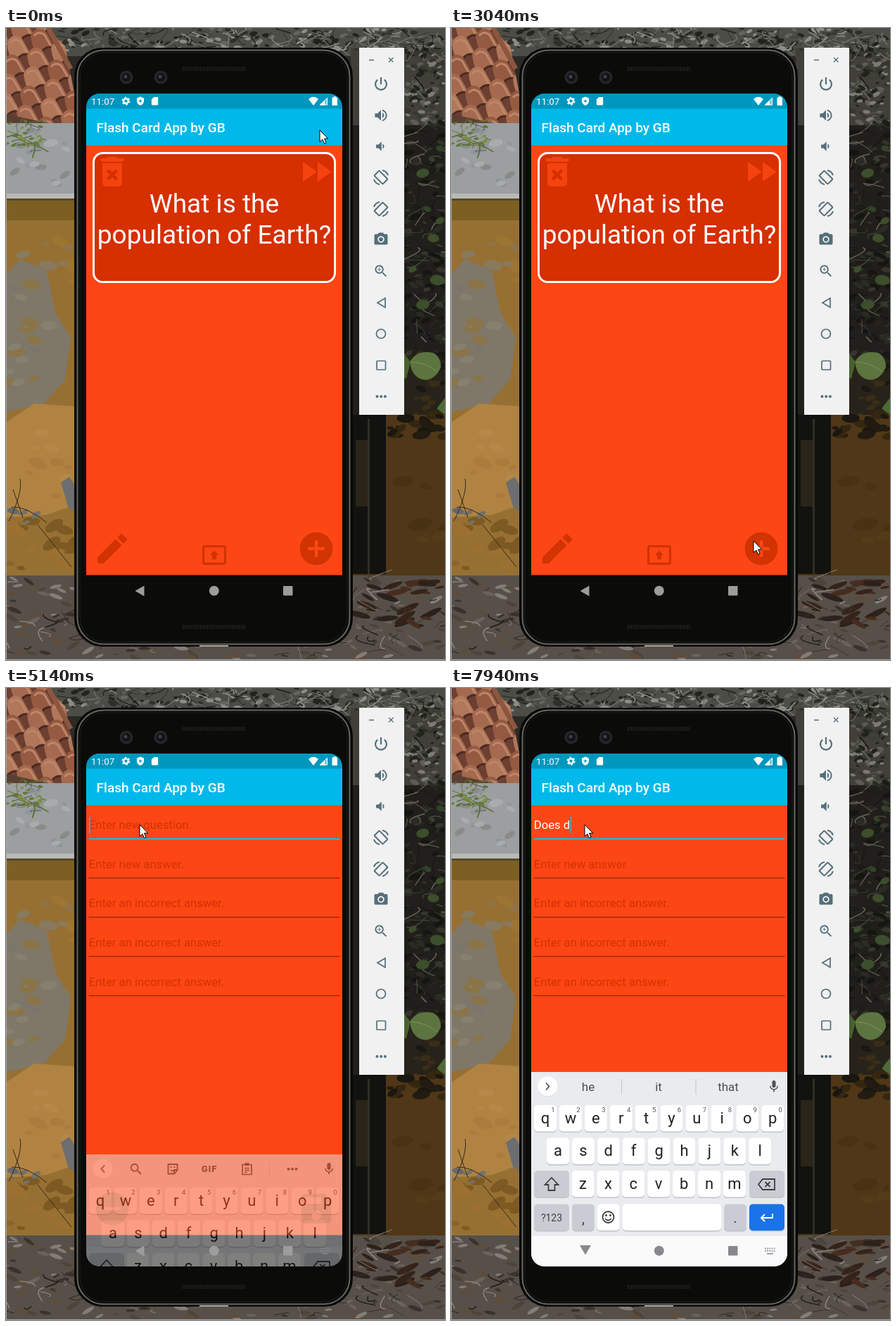
An HTML page that plays this animation: 624x897 px, repeating every 8 s.

```html
<!DOCTYPE html>
<html lang="en">
<head>
<meta charset="utf-8">
<title>Flash cards</title>
<style>
html, body { margin: 0; width: 100%; height: 100%; overflow: hidden; background: #333; }
svg { display: block; width: 100vw; height: 100vh; }
text { font-family: Roboto, sans-serif; white-space: pre; }
</style>
</head>
<body>
<svg id="stage" viewBox="0 0 624 897"></svg>
<script>
const ORANGE = '#fc4614', CARD = '#d62f00', DIM = '#d13302', CYAN = '#00b9ea', TEAL = '#0097be';
const SLATE = '#546e7a', GREY = '#50545a', BEZEL = '#0b0b09';

// ---- drawing helpers ----
const rect = (x, y, w, h, fill, r = 0, more = '') =>
  `<rect x="${x}" y="${y}" width="${w}" height="${h}" rx="${r}" fill="${fill}" ${more}/>`;
const circle = (x, y, r, fill, more = '') => `<circle cx="${x}" cy="${y}" r="${r}" fill="${fill}" ${more}/>`;
const shape = (d, fill, more = '') => `<path d="${d}" fill="${fill}" ${more}/>`;
const line = (d, stroke, width = 2, more = '') =>
  `<path d="${d}" fill="none" stroke="${stroke}" stroke-width="${width}" ${more}/>`;
const text = (x, y, s, size, fill, anchor = 'start', more = '') =>
  `<text x="${x}" y="${y}" font-size="${size}" fill="${fill}" text-anchor="${anchor}" ${more}>${s}</text>`;
const group = (id, body, more = '') => `<g id="${id}" ${more}>${body}</g>`;
const place = (x, y, scale, body) => `<g transform="translate(${x} ${y}) scale(${scale}) translate(-12 -12)">${body}</g>`;
const icon = (name, x, y, scale, fill) => place(x, y, scale, shape(ICONS[name], fill, 'fill-rule="evenodd"'));
const repeat = (n, f) => Array.from({ length: n }, (_, i) => f(i)).join('');

const DISC = 'M12 2a10 10 0 1 0 .01 0z';
const LENS = 'M15.5 14h-.8l-.3-.3A6.5 6.5 0 1 0 13.7 14.4l.3.3v.8l5 5 1.5-1.5zm-6 0a4.5 4.5 0 1 1 .01 0z';
const ICONS = {
  trash: 'M6 19c0 1.1.9 2 2 2h8c1.1 0 2-.9 2-2V7H6zm2.46-7.12 1.41-1.41L12 12.59l2.12-2.12 1.41 1.41L13.41 14l2.12 2.12-1.41 1.41L12 15.41l-2.12 2.12-1.41-1.41L10.59 14zM15.5 4l-1-1h-5l-1 1H5v2h14V4z',
  next: 'M4 18l8.5-6L4 6zM13 6v12l8.5-6z',
  edit: 'M3 17.25V21h3.75L17.81 9.94l-3.75-3.75zM20.71 7.04c.39-.39.39-1.02 0-1.41l-2.34-2.34c-.39-.39-1.02-.39-1.41 0l-1.83 1.83 3.75 3.75z',
  show: 'M21 3H3c-1.1 0-2 .9-2 2v14c0 1.1.9 2 2 2h18c1.1 0 2-.9 2-2V5c0-1.1-.9-2-2-2zm0 16H3V5h18zM10 12H8l4-4 4 4h-2v4h-4z',
  add: DISC + 'M17 13h-4v4h-2v-4H7v-2h4V7h2v4h4z',
  remove: DISC + 'M17 13H7v-2h10z',
  save: 'M17 3H5c-1.1 0-2 .9-2 2v14c0 1.1.9 2 2 2h14c1.1 0 2-.9 2-2V7zm-5 16a3 3 0 1 1 .01 0zm3-10H5V5h10z',
  quiet: 'M18.5 12c0-1.8-1-3.3-2.5-4v8c1.5-.7 2.5-2.2 2.5-4zM5 9v6h4l5 5V4L9 9z',
  loud: 'M3 9v6h4l5 5V4L7 9zM16.5 12c0-1.8-1-3.3-2.5-4v8c1.5-.7 2.5-2.2 2.5-4zM14 3.2v2.1a7 7 0 0 1 0 13.4v2.1a9 9 0 0 0 0-17.6z',
  camera: 'M9 2 7.2 4H4c-1.1 0-2 .9-2 2v12c0 1.1.9 2 2 2h16c1.1 0 2-.9 2-2V6c0-1.1-.9-2-2-2h-3.2L15 2zm3 15a5 5 0 1 1 .01 0zM12 15.2a3.2 3.2 0 1 0-.01 0z',
  search: LENS,
  zoom: LENS + 'M9 7h1v2h2v1h-2v2H9v-2H7V9h2z',
  shield: 'M12 1 3 5v6c0 5.5 3.8 10.7 9 12 5.2-1.3 9-6.5 9-12V5zM12 7l1.5 3.5L17 12l-3.5 1.5L12 17l-1.5-3.5L7 12l3.5-1.5z',
  sdcard: 'M18 2h-8L4 8v12c0 1.1.9 2 2 2h12c1.1 0 2-.9 2-2V4c0-1.1-.9-2-2-2z',
  mic: 'M12 14c1.7 0 3-1.3 3-3V5a3 3 0 0 0-6 0v6c0 1.7 1.3 3 3 3zM17.3 11a5.3 5.3 0 0 1-10.6 0H5c0 3.4 2.7 6.2 6 6.7V21h2v-3.3c3.3-.5 6-3.3 6-6.7z',
};

// ---- garden wall behind the phone ----
let seed = 7;
const random = () => (seed = seed * 16807 % 2147483647) / 2147483647;
const pick = list => list[Math.floor(random() * list.length)];
const scatter = (n, x, y, w, h, size, colors, flat = .5) => repeat(n, () => {
  const cx = x + random() * w, cy = y + random() * h, r = size * (.4 + random() * .8);
  return `<ellipse cx="${cx}" cy="${cy}" rx="${r}" ry="${r * flat}" fill="${pick(colors)}" transform="rotate(${random() * 70 - 35} ${cx} ${cy})"/>`;
});
const twigs = (n, x, y, w, h, colors) => repeat(n, () => {
  const px = x + random() * w, py = y + random() * h;
  return line(`M${px} ${py}q${random() * 30 - 15} ${random() * 16 - 8} ${random() * 60 - 30} ${random() * 40 - 20}`, pick(colors), .5 + random() * 1.2);
});
// Rounded clay tiles in columns that run down to the right.
const tiles = repeat(6, row => repeat(5, col => {
  const x = col * 29 - row * 5 - 18, y = row * 27 + col * 17 - 58;
  return `<g transform="translate(${x} ${y})">` +
    shape('M0 8Q8-8 21 1L35 26Q22 20 12 37Q2 28 0 8z', ['#a4694e', '#955a42', '#b1775a'][(row * 2 + col) % 3]) +
    line('M5 8Q12 0 20 7L29 23', '#bd8669', 3) + line('M12 36Q21 19 35 26', '#4a2a22', 3) + '</g>';
}));

const garden = rect(0, 0, 624, 897, '#2c2a25') +
  rect(60, 0, 564, 40, '#4d4d47') + rect(490, 28, 134, 110, '#403f39') +
  scatter(160, 80, 0, 544, 32, 6, ['#2e2e2a', '#65655f', '#8d8d87', '#22221f']) +
  twigs(130, 80, 0, 544, 34, ['#1f1e1b', '#8f8f89', '#3b3932', '#6f6e68']) +
  rect(490, 138, 134, 412, '#211f1b') +
  scatter(90, 566, 30, 58, 105, 6, ['#23231e', '#5c5c54', '#35362f', '#7c7b74']) +
  scatter(110, 566, 135, 58, 330, 7, ['#151512', '#2a2b25', '#36352c', '#1b1c17']) +
  twigs(90, 566, 20, 58, 430, ['#66645c', '#141411', '#3a412d']) +
  scatter(9, 575, 160, 46, 240, 9, ['#3c4e2b', '#32422a'], .7) +
  rect(566, 465, 58, 85, '#28231a') + scatter(20, 566, 465, 58, 85, 8, ['#1a1813', '#3a2d18']) +
  rect(490, 549, 134, 228, '#4f3717') +
  scatter(22, 540, 548, 84, 34, 11, ['#211b12', '#35270f', '#191710']) +
  shape('M490 549h50v226h-50z', '#12120f') + rect(497, 585, 20, 94, '#2b2519') + rect(514, 555, 3, 220, '#302e28') +
  scatter(6, 545, 620, 79, 130, 16, ['#543b19', '#493214']) +
  shape('M574 474q10-18 33-13 12 7 11 21-9 19-25 17-16-3-19-25z', '#5c7540') + line('M575 474q20 0 38 14', '#7d9459', 1) +
  shape('M566 462l9 12-6 24-3-2z', '#47612f') + shape('M612 540l12-15v24z', '#4e6a37') +
  `<clipPath id="roof"><path d="M0 0H58L84 26 97 92V135H0z"/></clipPath>` +
  `<g clip-path="url(#roof)">${rect(0, 0, 100, 140, '#6c3f31')}${tiles}</g>` +
  line('M60 0L92 58', '#8b5640', 7) + shape('M0 122L60 135H0z', '#5a4032') +
  rect(0, 135, 98, 105, '#9b9f9f') + scatter(18, 12, 145, 76, 80, 9, ['#90959a', '#a8acac', '#878c8b']) +
  twigs(18, 4, 135, 45, 45, ['#596a2e', '#73833c', '#4a4a30']) + scatter(24, 2, 130, 50, 40, 3.5, ['#5f7733', '#7b8e45']) +
  rect(0, 235, 98, 7, '#b9bab6') + rect(0, 242, 98, 4, '#57492a') +
  rect(0, 245, 98, 532, '#967033') + rect(0, 245, 98, 28, '#7c5f22') +
  scatter(12, 0, 300, 98, 60, 12, ['#8d744a', '#9c7533', '#887a60']) +
  shape('M0 350l20-22 38 16 12 60 22 35-8 60-30 34-54 12z', '#7f7869') +
  scatter(20, 0, 360, 64, 165, 11, ['#7a766c', '#86806f', '#8a7448']) +
  shape('M0 560l40-27 58 4v140l-40 14-58 4z', '#b08343') +
  scatter(9, 0, 570, 90, 110, 13, ['#b58849', '#a97c3d']) +
  scatter(18, 0, 695, 98, 72, 12, ['#8a6428', '#7d5923', '#9b7031']) +
  shape('M78 645l12-8 8 12v38l-10-8z', '#6d6e70') + scatter(8, 8, 685, 35, 25, 7, ['#66696a', '#747167']) +
  line('M4 700q20-40 16-60M8 680q20-2 50 22M45 705l48 60M10 655l14 40', '#33291b', 1) +
  rect(0, 777, 624, 120, '#575049') +
  scatter(230, 0, 780, 624, 116, 9, ['#39332c', '#69635c', '#827d76', '#4d443b', '#5f4c39'], .3) +
  scatter(28, 500, 785, 124, 65, 15, ['#35231a', '#472d20', '#2a221b'], .25) +
  twigs(100, 0, 780, 624, 110, ['#231f1b', '#8f8a83', '#3e3026']) +
  line('M.5 0V896.5H624', '#a5a5a3', 1);

// ---- emulator side panel ----
const rotateIcon = (y, flip) => `<g transform="translate(533 ${y}) scale(${flip} 1)" fill="none" stroke="${SLATE}" stroke-width="2">
  <rect x="-8.5" y="-5" width="17" height="10" rx="1" transform="rotate(45)"/><path d="M2-10Q8-9 10-3M-2 10Q-8 9-10 3"/></g>`;
const panel = rect(502, 28, 64, 521, '#f1f1f1') +
  line('M516 45.5h7M544 42l6.5 6.5m0-6.5l-6.5 6.5', SLATE, 1.3) +
  line('M533 70v10M528.2 73.3a8 8 0 1 0 9.6 0', SLATE, 2.2) +
  icon('loud', 533, 124, .95, SLATE) + icon('quiet', 532, 168, .85, SLATE) + rotateIcon(212, 1) + rotateIcon(257, -1) +
  icon('camera', 533, 300, .95, SLATE) + icon('zoom', 533, 345, .95, SLATE) +
  line('M539 383.5v13l-11-6.5z', SLATE, 1.7) + circle(533, 434, 6.5, 'none', `stroke="${SLATE}" stroke-width="1.7"`) +
  rect(527, 472.5, 12.5, 12.5, 'none', 1, `stroke="${SLATE}" stroke-width="1.7"`) +
  repeat(3, i => circle(527.5 + 5.7 * i, 523, 2, SLATE));

// ---- phone ----
const grille = y => line(`M251 ${y}H341`, '#34342f', 6, 'stroke-dasharray="1 1.5" opacity=".7"');
const body = rect(97, 28, 396, 850, '#080807', 40) +
  rect(101.5, 31.5, 387, 843, BEZEL, 37, 'stroke="#666762" stroke-width="2"') +
  rect(105, 35, 380, 836, BEZEL, 34, 'stroke="#1e1e1b" stroke-width="1"') +
  rect(275, 876, 41, 2, '#a5a39c') + grille(58) + grille(850) +
  [171, 220].map(x => circle(x, 70, 9.5, '#252628') + circle(x, 70, 6, '#121318') + circle(x - 1, 69, 2.5, '#3a4150')).join('');

const header = rect(114, 93, 364, 22, TEAL) + rect(114, 114.5, 364, 52, CYAN) +
  text(128.6, 148, 'Flash Card App by GB', 19, '#fff', 'start', 'font-weight="500"');
const cardScreen = rect(114, 160, 364, 616.5, ORANGE) + header +
  rect(124.5, 179.5, 343, 183, '#9e2604', 13, 'opacity=".45"') +
  rect(124.5, 177.5, 343, 183, CARD, 13, 'stroke="#fff" stroke-width="3"') +
  icon('trash', 151, 203.7, 2.333, '#f5430f') + icon('next', 440.7, 204, 2.333, '#f5430f') +
  text(296, 262, 'What is the', 37.1, '#fff', 'middle') + text(296, 305.5, '', 37.1, '#fff', 'middle', 'id="subject"') +
  icon('edit', 151, 739, 2.333, DIM) + icon('show', 296, 748, 1.545, DIM) + icon('add', 441, 739, 2.333, DIM);

const hints = ['new question', 'new answer', 'an incorrect answer', 'an incorrect answer', 'an incorrect answer'];
const formScreen = rect(114, 160, 364, 616.5, ORANGE) + rect(114, 776.5, 364, 40, '#000') + header +
  hints.map((hint, i) => text(117.8, 200 + 55.65 * i, `Enter ${hint}.`, 16.7, DIM, 'start', i ? '' : 'id="hint"') +
    rect(117.5, 213.5 + 55.65 * i, 357, 1.1, '#85230a')).join('') +
  rect(117.5, 213, 357, 2.4, '#2fb0cc', 0, 'id="focus"') +
  text(117.8, 200, '', 16.7, '#fff', 'start', 'id="typed"') + rect(0, 182.5, 1.9, 23.5, '#1fb4d8', 0, 'id="caret"') +
  icon('remove', 151, 739, 2.333, DIM) + icon('save', 441, 739, 2.333, DIM);

const statusBar = text(121, 108.6, '11:07', 13.4, '#fff') +
  circle(170.5, 103.7, 3.3, 'none', 'stroke="#fff" stroke-width="2.4"') +
  circle(170.5, 103.7, 5, 'none', 'stroke="#fff" stroke-width="2" stroke-dasharray="2.6 2.636"') +
  icon('shield', 191, 103.7, .56, '#fff') + icon('sdcard', 211.5, 103.7, .58, '#fff') +
  shape('M437 110l-7-9q7-6.500 14 0z', '#fff') + shape('M446 109.500h11v-11z', '#fff', 'opacity=".45"') +
  line('M446.500 109h10V99.500z', '#fff', 1) + shape('M446 109.500h7v-7z', '#fff') + rect(463.5, 98.5, 7.5, 11.5, '#fff', 1) + rect(465.5, 97.3, 3.5, 2, '#fff');

// ---- keyboard ----
const keyCap = (x, y, w, fill = '#fff') => rect(x, y + 1, w, 38, '#bfc3c8', 5) + rect(x, y, w, 37.5, fill, 5);
const keyRow = (letters, x, y) => [...letters].map((c, i) => {
  const cx = x + 35.9 * i;
  return keyCap(cx - 16, y, 32) + text(cx, y + 25.5, c, 22, '#202124', 'middle');
}).join('');
const SOFT = '#c9cdd3';
const toolIcons = line('M140 560.500l-4.500 5 4.500 5', GREY, 1.8) + icon('search', 185, 566, .9, GREY) +
  line('M230.500 559h13v8.500l-4.500 5h-8.500zM244 567h-5v5M234 567q2.500 3 5 0', GREY, 1.8) + rect(233.5, 562, 2, 2, GREY) + rect(238.5, 562, 2, 2, GREY) +
  text(289, 570.3, 'GIF', 13, GREY, 'middle', 'font-weight="900" letter-spacing=".8"') +
  line('M336 559.500h13v14h-13zM339 564.500h7m-7 3h7m-7 3h4', GREY, 1.7) + rect(339.5, 557, 6, 4, GREY) +
  rect(374, 556, 1, 20, '#cdd0d4') + repeat(3, i => circle(401.5 + 5.5 * i, 565.7, 2, GREY));
const wordBar = line('M135 560.500l4.500 5-4.500 5', GREY, 1.8) + rect(242, 555, 1, 22, '#c4c7cb') + rect(347.5, 555, 1, 22, '#c4c7cb') +
  [195, 295, 394].map(x => text(x, 571.7, '', 17, '#4a4e54', 'middle', 'class="word"')).join('');
const keyboard = rect(114, 545, 364, 276, '#e9ebee') + circle(137.5, 566, 14, '#d3d6da') + circle(137.5, 565.3, 14, '#fff') +
  group('tools', toolIcons) + group('words', wordBar) + icon('mic', 459, 565.5, .85, GREY) +
  keyRow('qwertyuiop', 134, 592) + repeat(10, i => text(145 + 35.9 * i, 601.5, (i + 1) % 10, 9.5, GREY, 'middle')) +
  keyRow('asdfghjkl', 152, 638.5) + keyRow('zxcvbnm', 187.5, 685) +
  keyCap(118, 685, 50, SOFT) + line('M143 695l-9.500 10h5v8h9v-8h5z', '#3c4043', 1.8) +
  keyCap(424, 685, 50, SOFT) + line('M443 697h17v15h-17l-6-7.500zM446.500 701l7 7m0-7l-7 7', '#3c4043', 1.8) +
  keyCap(118, 732.5, 50, SOFT) + text(143, 757, '?123', 14, '#3c4043', 'middle') +
  keyCap(172, 732.5, 32, SOFT) + text(188, 760, ',', 20, '#3c4043', 'middle') +
  keyCap(207.5, 732.5, 32) + circle(223.5, 751, 8, 'none', 'stroke="#3c4043" stroke-width="1.8"') +
  circle(220.5, 748.5, 1.4, '#3c4043') + circle(226.5, 748.5, 1.4, '#3c4043') + line('M219 753q4.500 5 9 0', '#3c4043', 1.8) +
  keyCap(243.5, 732.5, 140.5) + keyCap(388, 732.5, 32, SOFT) + text(404, 759, '.', 20, '#3c4043', 'middle') +
  keyCap(424, 732.5, 50, '#1a73e8') + line('M457 746v6h-16m5-5l-5 5 5 5', '#fff', 2) + rect(114, 778, 364, 43, '#fafafb');
const nav = shape('M196.500 791.500v15l-13-7.500z', 'inherit', 'id="back"') + shape('M183 791h16l-8 13.500z', 'inherit', 'id="down"') +
  circle(295.8, 798.7, 7, 'inherit') + rect(394, 792, 13.5, 13.5, 'inherit', 1) +
  group('switcher', line('M446 795.500h15m-15 3.500h15', '#9a9ca0', 1.8, 'stroke-dasharray="1.800 1.400"') + rect(449, 802, 9, 1.8, '#9a9ca0'));

const $ = id => document.getElementById(id);
$('stage').innerHTML = `<clipPath id="screen">${rect(114, 93, 364, 728, '#000', 19)}</clipPath>
  <clipPath id="window">${rect(114, 93, 364, 700, '#000')}</clipPath>` +
  garden + panel + body +
  `<g clip-path="url(#screen)"><g clip-path="url(#window)">` +
  group('cards', cardScreen) + rect(114, 93, 364, 700, '#000', 0, 'id="shade" opacity=".2"') + group('form', formScreen) + '</g>' +
  statusBar + group('keyboard', keyboard) + group('nav', nav) + '</g>' +
  group('cursor', shape('M0 0V16.500L3.900 13l2.600 6 2.600-1.100L6.500 12H11.800z', '#fff', 'stroke="#000" stroke-width="1" stroke-linejoin="round"'));

// ---- timeline ----
const cursorPath = [
  [0, 446, 145], [150, 436, 145], [270, 440, 146], [420, 455, 160], [560, 455, 176], [690, 449, 188], [810, 444, 196],
  [2130, 428, 506], [2280, 452, 590], [2400, 463, 650], [2520, 448, 695], [2640, 430, 713], [2920, 425, 725], [3040, 430, 728],
  [3190, 435, 732], [4090, 290, 478], [4240, 146, 290], [4360, 167, 253], [4510, 180, 222], [4630, 189, 200], [4780, 190, 194],
];
const windowScale = [[0, 1, 0], [3700, 1.041, .979], [3820, 1.05, .995], [3940, 1.05, 1]];
const keyboardRise = [[0, 276, 0], [5020, 205, .18], [5140, 117, .48], [5290, 0, 1]];
const typing = [[0, ''], [5970, 'D'], [6220, 'Do'], [6830, 'Doe'], [7200, 'Does'], [7820, 'Does '], [7940, 'Does d']];
const suggestions = [
  [0], [6340, 'do', 'Do', 'Does'], [6460, 'Don’t', 'Do', 'Does'], [6950, 'Doe', 'Does', 'Done'],
  [7320, 'Doe', 'Does', 'Doesn’t'], [7570, 'does', 'Does', 'Doesn’t'], [7820, 'he', 'it', 'that'],
];
const at = (steps, t) => steps.findLast(step => step[0] <= t).slice(1);
const show = (id, visible) => $(id).setAttribute('visibility', visible ? 'inherit' : 'hidden');
const move = (id, transform) => $(id).setAttribute('transform', transform);
const zoom = (id, s) => move(id, `translate(296 457) scale(${s}) translate(-296 -457)`);

function draw(now) {
  const t = now % 8000;
  move('cursor', `translate(${at(cursorPath, t)})`);
  $('subject').textContent = t >= 1100 && t < 1740 ? 'capital of France?' : 'population of Earth?';

  const [oldScale, newScale] = at(windowScale, t);
  zoom('cards', oldScale);
  zoom('form', newScale || 1);
  show('form', newScale);
  show('shade', newScale);

  const [typed] = at(typing, t);
  const focused = t >= 4900;
  $('typed').textContent = typed;
  show('hint', !typed);
  show('focus', focused);
  show('caret', focused && (t < 5440 || typed));
  $('caret').setAttribute('x', 118 + $('typed').getComputedTextLength());

  const [drop, alpha] = at(keyboardRise, t);
  move('keyboard', `translate(0 ${drop})`);
  $('keyboard').setAttribute('opacity', alpha);
  $('switcher').setAttribute('opacity', alpha);
  $('nav').setAttribute('fill', alpha === 1 ? '#88888b' : '#9c9c9c');
  show('back', t < 5440);
  show('down', t >= 5440);

  const words = at(suggestions, t);
  show('tools', !words.length);
  show('words', words.length);
  document.querySelectorAll('.word').forEach((el, i) => el.textContent = words[i] || '');
  requestAnimationFrame(draw);
}
draw(0);
</script>
</body>
</html>
```
